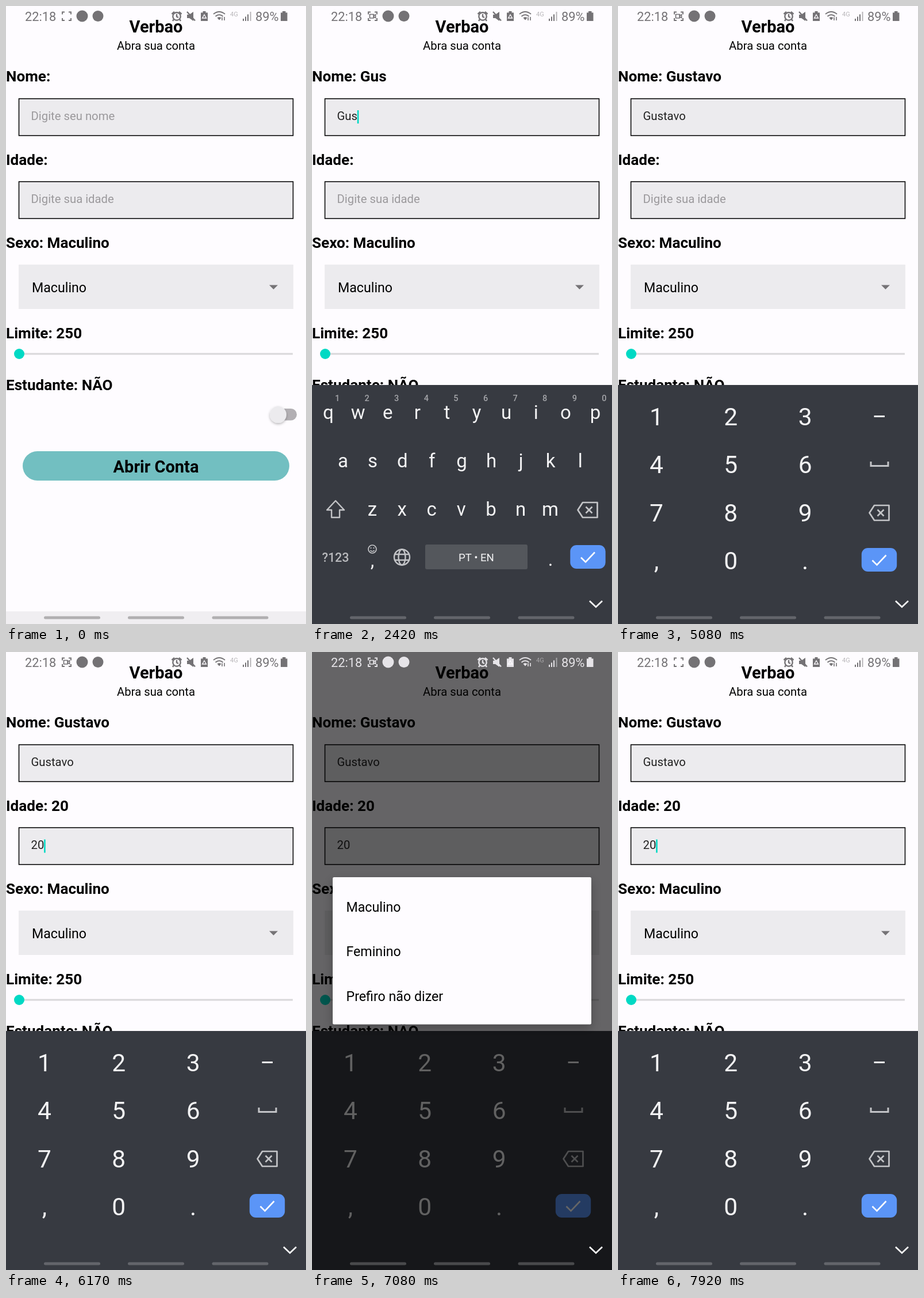
These frames come from a looping animation (522 px wide and 1073 px high, 8000 ms). An HTML page:

```html
<!DOCTYPE html>
<html lang="pt">
<head>
<meta charset="utf-8">
<title>Abra sua conta</title>
<style>
html, body { margin: 0; width: 100%; height: 100%; overflow: hidden; background: #fefcff; }
svg { display: block; width: 100vw; height: 100vh; font-family: Roboto, sans-serif; }
.title { font-size: 29px; font-weight: 700; text-anchor: middle; }
.sub { font-size: 20.3px; text-anchor: middle; }
.label { font-size: 26.1px; font-weight: 700; }
.field { fill: #ecebee; stroke: #0b0b0c; stroke-width: 1.6; }
.input { font-size: 20.3px; fill: #222; }
.option { font-size: 23.2px; }
.letter, .digit, .small, .hint, .mid { text-anchor: middle; fill: #f3f3f4; }
.letter { font-size: 33px; }
.digit { font-size: 42.5px; }
.hint { font-size: 14.5px; font-weight: 500; fill: #a4a5a9; }
.mid { font-size: 21.5px; font-weight: 500; fill: #b9babd; }
.small { font-size: 18.6px; }
.line { fill: none; stroke: currentColor; }
#caret, .accent { fill: #00d9c4; }
</style>
</head>
<body>
<svg viewBox="0 0 522 1073">
  <defs>
    <filter id="shadow" x="-20%" y="-20%" width="140%" height="150%">
      <feDropShadow dx="0" dy="2" stdDeviation="2" flood-opacity=".28"/>
    </filter>
    <filter id="lift" x="-10%" y="-10%" width="120%" height="130%">
      <feDropShadow dx="0" dy="7" stdDeviation="9" flood-opacity=".25"/>
    </filter>
    <clipPath id="row"><rect x="36" y="403" width="450" height="77"/></clipPath>
    <g id="erase" class="line" stroke-width="2.7" stroke-linejoin="round">
      <path d="M-17.5 0L-9-13H16.5V13H-9ZM-3.5-5.5L7.5 5.5M7.5-5.5L-3.5 5.5"/>
    </g>
    <g id="enter">
      <rect x="-30.7" y="-20.5" width="61.4" height="41" rx="11" fill="#5b95f7"/>
      <path d="M-12 1L-4 9L12-8" fill="none" stroke="#fff" stroke-width="2.6"/>
    </g>
  </defs>

  <rect width="522" height="1073" fill="#fefcff"/>
  <text class="title" x="261" y="46">Verbao</text>
  <text class="sub" x="261" y="76">Abra sua conta</text>
  <text class="label" id="nameLabel" x="0" y="131"></text>
  <rect class="field" x="22.5" y="161" width="477" height="64"/>
  <text class="input" id="name" x="43.5" y="198"></text>
  <text class="label" id="ageLabel" x="0" y="275.5"></text>
  <rect class="field" x="22.5" y="305" width="477" height="64"/>
  <text class="input" id="age" x="43.5" y="342"></text>
  <rect id="caret" width="2.6" height="23"/>
  <text class="label" x="0" y="420">Sexo: Maculino</text>
  <rect x="22" y="449" width="478" height="77" fill="#ecebee"/>
  <circle id="tap" cx="465" cy="487.5" fill-opacity=".12"/>
  <text class="option" x="45" y="497">Maculino</text>
  <path d="M458 484.5H473L465.5 492Z" fill="#757376"/>
  <text class="label" x="0" y="576.5">Limite: 250</text>
  <path d="M23 604H499" stroke="#d9d8da" stroke-width="3"/>
  <circle class="accent" cx="23" cy="604" r="9"/>
  <text class="label" x="0" y="667">Estudante: NÃO</text>
  <rect x="466" y="699" width="40" height="20.5" rx="10.2" fill="#b2afb3"/>
  <circle cx="473.5" cy="709.5" r="14.5" fill="#ecebee" filter="url(#shadow)"/>
  <rect x="29" y="773" width="464" height="51" rx="25.5" fill="#72bfc1"/>
  <text class="title" x="261" y="810">Abrir Conta</text>
  <rect id="resized" y="658" width="522" height="415" fill="#fefcff"/>
  <rect y="1051" width="522" height="22" fill="#f0eef1"/>

  <g id="keyboard" color="#c3c4c7">
    <rect y="658" width="522" height="440" fill="#373a41"/>
    <g id="alpha">
      <g id="keys"></g>
      <path id="shift" d="M41 859L56 875H48V888H34V875H26Z" stroke="#c3c4c7" stroke-width="2.4" stroke-linejoin="round"/>
      <use href="#erase" x="480" y="875"/>
      <text class="mid" x="41" y="964.5">?123</text>
      <g class="line" stroke-width="1.7">
        <circle cx="105" cy="943" r="7"/>
        <path d="M101.500 945Q105 949 108.500 945M102.500 940V942M107.500 940V942"/>
      </g>
      <text class="letter" x="105" y="974">,</text>
      <g class="line" stroke-width="2.4">
        <circle cx="156.500" cy="957" r="13.500"/>
        <ellipse cx="156.500" cy="957" rx="6" ry="13.500"/>
        <path d="M144 952H169M144 962H169"/>
      </g>
      <rect x="197" y="935" width="178" height="43" rx="3" fill="#54575c"/>
      <text class="small" x="286" y="964">PT • EN</text>
      <text class="letter" x="415" y="972">.</text>
      <use href="#enter" x="480" y="956.500"/>
      <rect id="enterPress" x="447" y="930" width="66" height="55" rx="10" fill="#fff" opacity=".12"/>
      <g id="popup">
        <rect x="-28" y="-93" width="57" height="119" rx="8" fill="#505359"/>
        <text class="letter" id="popupText" x="0" y="-42"></text>
      </g>
    </g>
    <g id="numeric">
      <rect id="numPress" x="131" width="130" height="81" rx="8" fill="#4b4e55"/>
      <g id="numbers"></g>
      <path d="M445.500 712.500H464" stroke="#f3f3f4" stroke-width="3"/>
      <path class="line" d="M440 791V798.500H470V791" stroke-width="3"/>
      <use href="#erase" x="455" y="880"/>
      <use href="#enter" x="454.500" y="961.500"/>
    </g>
  </g>

  <rect id="dim" width="522" height="1073"/>
  <g id="dialog">
    <rect x="36" y="391" width="450" height="255.500" rx="2.500" fill="#fefcff" filter="url(#lift)"/>
    <g clip-path="url(#row)"><circle id="pick" cx="261" cy="441.500" fill-opacity=".09"/></g>
    <text class="option" x="59.500" y="450.500">Maculino</text>
    <text class="option" x="59.500" y="528">Feminino</text>
    <text class="option" x="59.500" y="605.500">Prefiro não dizer</text>
  </g>

  <g id="status" fill="currentColor">
    <g font-size="21.800"><text x="33" y="25.500">22:18</text><text x="434" y="25.500">89%</text></g>
    <path class="line" stroke-width="1.900" d="M102 10.500H98V14.500M109 10.500H113V14.500M98 21V25H102M113 21V25H109"/>
    <path id="camera" class="line" stroke-width="1.700" d="M100.500 14.500H107V21H100.500ZM107 17L110.500 15V20.500L107 18.500"/>
    <circle cx="132.500" cy="17.500" r="10"/><circle cx="160" cy="17.500" r="9.500"/>
    <g class="line" stroke-width="2.400">
      <circle cx="297" cy="18" r="6.700"/>
      <path d="M297 14V18.500L300 20M288.500 14L293 10M305.500 14L301 10M292 23L290 26M302 23L304 26"/>
      <path d="M315 10L329 25.500"/>
      <path d="M361 14Q371 6 381 14M364.500 18Q371 12.500 377.500 18" stroke-width="2"/>
      <path d="M376 25V19.500M380 19V25" stroke-width="1.600"/>
    </g>
    <path d="M315 15H319L326 10V26L319 21H315Z"/>
    <path d="M342.500 9H347.500V11.500H351V26H339V11.500H342.500Z"/>
    <path d="M345 15L348.500 21H341.500Z" fill="none" stroke="#fefcff" stroke-width="1.300"/>
    <path d="M367.500 20.500Q371 18 374.500 20.500L371 24.500Z"/>
    <text x="390" y="17.500" font-size="11" opacity=".5">4G</text>
    <path d="M412 22H414V26H412ZM416 18.500H418V26H416ZM420 14.500H422V26H420Z"/><path d="M424.500 10H426.500V26H424.500Z" opacity=".5"/>
    <path d="M481 9H486.500V11.500H489.500V26H478V11.500H481Z"/>
  </g>
  <g id="nav">
    <rect x="66" y="1059.500" width="98" height="5" rx="2.500"/>
    <rect x="212" y="1059.500" width="98" height="5" rx="2.500"/>
    <rect x="358.500" y="1059.500" width="98" height="5" rx="2.500"/>
  </g>
  <path id="hide" d="M483 1033L494 1043.500L505 1033" fill="none" stroke-width="2.700"/>
</svg>
<script>
const $ = id => document.getElementById(id);
const text = (cls, x, y, s) => `<text class="${cls}" x="${x}" y="${y}">${s}</text>`;
const LOOP = 8000, PITCH = 51.6;
const rows = [['qwertyuiop', 28.5, 717], ['asdfghjkl', 54, 801], ['zxcvbnm', 105, 885]];
const spots = {};

$('keys').innerHTML = rows.map(([letters, x0, y]) => [...letters].map((c, i) => {
  spots[c] = [x0 + i * PITCH, y];
  return text('letter key', ...spots[c], c);
}).join('')).join('') +
  [...'1234567890'].map((d, i) => text('hint', 44 + i * PITCH, 686, d)).join('');
$('numbers').innerHTML = ['123', '456', '789', ',0.'].map((row, j) =>
  [...row].map((d, i) => text('digit', 67 + i * 129.3, 728 + j * 83.4, d)).join('')).join('');
const keyTexts = [...document.querySelectorAll('.key')];

const NAME = 'Gustavo', AGE = '20';
const nameTimes = [1580, 2000, 2250, 2580, 3080, 3420, 3750];
const ageTimes = [5830, 6000];
const caretOn = [[250, 750], [790, 1250], [1580, 2760], [3000, 4250], [4580, 5040], [5490, 6240], [7570, LOOP]];

const within = (t, a, b) => t >= a && t < b;
const show = (id, on) => $(id).setAttribute('visibility', on ? 'inherit' : 'hidden');
const set = (id, attrs) => { for (const k in attrs) $(id).setAttribute(k, attrs[k]); };
const typed = (word, times, t) => word.slice(0, times.filter(at => t >= at).length);

// Piecewise linear value through [time, value] points
function track(t, points) {
  let [t0, v0] = points[0];
  for (const [t1, v1] of points) {
    if (t < t1) return v0 + (v1 - v0) * Math.max(0, t - t0) / (t1 - t0 || 1);
    [t0, v0] = [t1, v1];
  }
  return v0;
}

function fill(id, value, placeholder) {
  $(id).textContent = value || placeholder;
  $(id).style.fill = value ? '#222' : '#9b999c';
}

function draw(t) {
  const name = typed(NAME, nameTimes, t), age = typed(AGE, ageTimes, t);
  $('nameLabel').textContent = 'Nome: ' + name;
  $('ageLabel').textContent = 'Idade: ' + age;
  fill('name', name, 'Digite seu nome');
  fill('age', age, 'Digite sua idade');

  const onAge = t >= 4500, value = onAge ? age : name;
  const width = value ? $(onAge ? 'age' : 'name').getComputedTextLength() : 0;
  set('caret', { x: 43.3 + width, y: onAge ? 325.5 : 181 });
  show('caret', caretOn.some(([a, b]) => within(t, a, b)));

  // Keyboard rises while fading in
  const rise = 1 - (1 - Math.min(1, Math.max(0, (t - 590) / 330))) ** 3;
  set('keyboard', { opacity: rise, transform: `translate(0 ${41 * (1 - rise) ** 0.85})` });
  show('resized', t >= 580);
  const upper = t < 1660, numeric = t >= 4660;
  keyTexts.forEach(k => {
    const c = k.textContent;
    k.textContent = upper ? c.toUpperCase() : c.toLowerCase();
  });
  set('shift', { fill: upper ? '#c3c4c7' : 'none' });
  show('alpha', !numeric);
  show('numeric', numeric);
  show('enterPress', within(t, 4420, 4580));

  const press = nameTimes.slice(0, 6).findIndex(at => within(t, at - 80, at));
  show('popup', press >= 0);
  if (press >= 0) {
    const c = NAME[press];
    $('popupText').textContent = c;
    set('popup', { transform: `translate(${spots[c.toLowerCase()]})` });
  }
  const digit = ageTimes.findIndex(at => within(t, at - 80, at + 70));
  show('numPress', digit >= 0);
  set('numPress', { y: digit ? 922 : 672 });

  // Picker dialog
  set('tap', { r: track(t, [[6740, 0], [6830, 20], [6900, 26]]), opacity: track(t, [[7000, 1], [7080, 0]]) });
  set('dim', { opacity: track(t, [[6890, 0], [6920, .07], [7000, .38], [7080, .6], [7600, .6], [7670, .53], [7750, .27], [7830, .07], [7900, 0]]) });
  set('dialog', { opacity: track(t, [[6880, 0], [6920, .2], [7000, .72], [7080, 1], [7600, 1], [7670, .77], [7750, .25], [7820, 0]]) });
  set('pick', { r: track(t, [[7540, 0], [7580, 55], [7670, 151], [7750, 230]]) });

  // System bars
  $('status').setAttribute('color', within(t, 7000, 7740) ? '#e6e4e8' : '#747275');
  show('camera', (t + 920) % 1000 < 500);
  const light = t >= 1000;
  set('nav', { fill: light ? '#fff' : '#000', opacity: light ? .22 : .26 });
  set('hide', { stroke: light ? '#fff' : '#1d1e20' });
  show('hide', t >= 660);
}

const start = performance.now();
(function tick() {
  draw((performance.now() - start) % LOOP);
  requestAnimationFrame(tick);
})();
</script>
</body>
</html>
```
